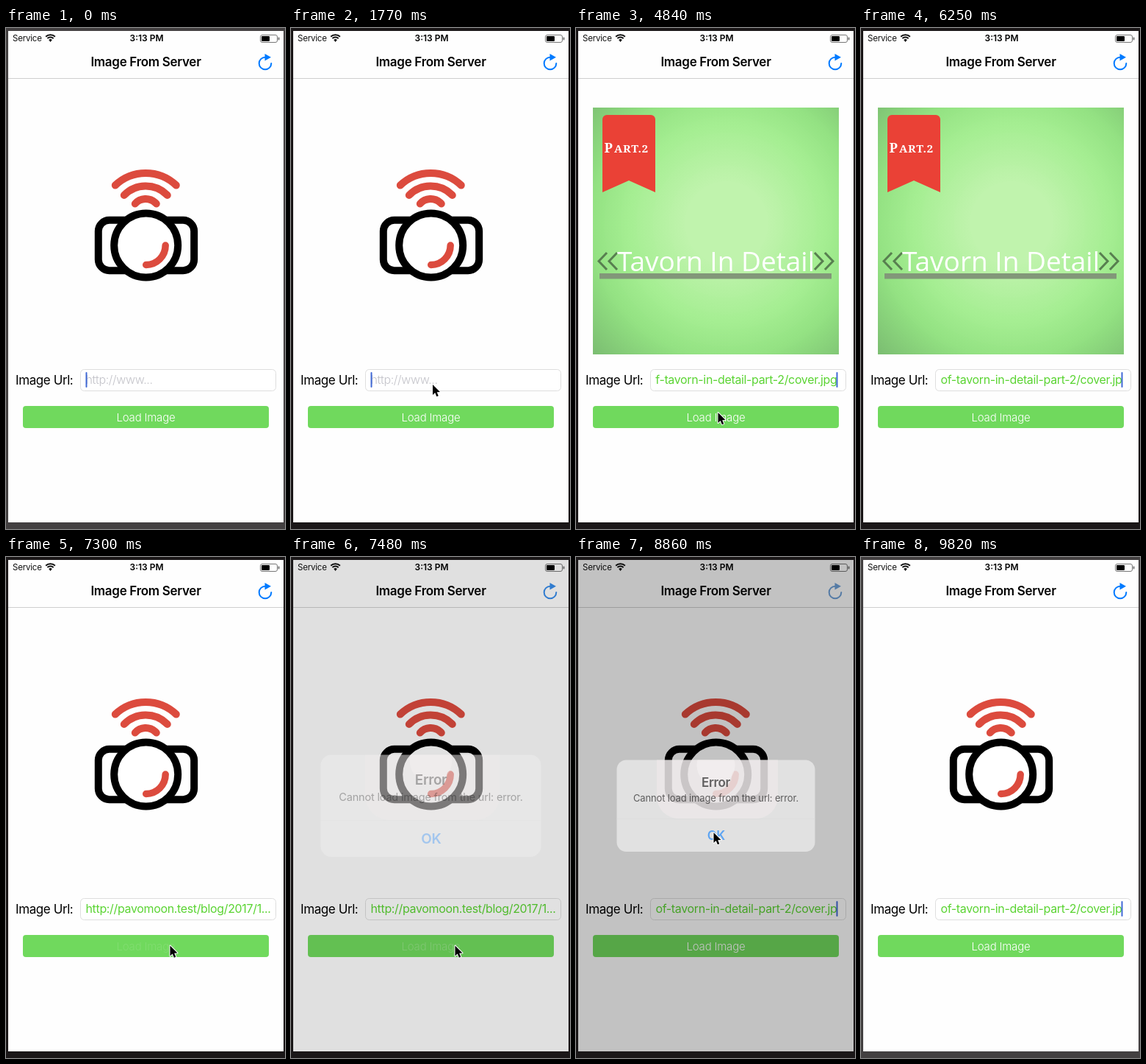
An HTML page with a canvas for the animation above (9890 ms loop, 380 by 680 pixels).

```html
<!DOCTYPE html>
<html lang="en">
<head>
<meta charset="utf-8">
<title>Image loader</title>
<style>
html, body { margin: 0; width: 100%; height: 100%; overflow: hidden; background: #1a1718; }
canvas { display: block; width: 380px; height: 680px; }
</style>
</head>
<body>
<canvas id="stage" width="380" height="680"></canvas>
<script>
const ctx = document.getElementById('stage').getContext('2d');
const LOOP = 9890;
const TAU = Math.PI * 2;
const BLUE = '#007aff', RED = '#dc4b3e', GREEN = '#70d95d', LINK = '#5bd433';
const SANS = 'Inter, "Liberation Sans", sans-serif';
const FULL_URL = 'f-tavorn-in-detail-part-2/cover.jpg';
const CUT_URL = 'of-tavorn-in-detail-part-2/cover.jp';
const HEAD_URL = 'http://pavomoon.test/blog/2017/1...';

// Moments of the story, in ms
const PASTED = 3520, LOADED = 4490, DELETED = 6100, FAILED = 7300, DISMISSED = 8680;

const clamp = u => Math.min(1, Math.max(0, u));
const ease = u => u * u * (3 - 2 * u);
const mix = (a, b, u) => a + (b - a) * u;
const ramp = (t, from, span) => ease(clamp((t - from) / span));
const pulse = (t, on, off, span) => ramp(t, on, span) - ramp(t, off, span);
const within = (t, a, b) => t >= a && t < b;

function box(x, y, w, h, r, fill) {
  ctx.beginPath();
  ctx.roundRect(x, y, w, h, r);
  if (fill) { ctx.fillStyle = fill; ctx.fill(); }
}

function disc(x, y, r, fill) {
  ctx.beginPath();
  ctx.arc(x, y, r, 0, TAU);
  ctx.fillStyle = fill;
  ctx.fill();
}

function poly(points, fill) {
  ctx.beginPath();
  points.forEach(([x, y]) => ctx.lineTo(x, y));
  ctx.closePath();
  if (fill) { ctx.fillStyle = fill; ctx.fill(); }
}

function stroke(color, width, cap = 'butt') {
  ctx.strokeStyle = color;
  ctx.lineWidth = width;
  ctx.lineCap = cap;
  ctx.stroke();
}

function arc(x, y, r, from, to, color, width, cap) {
  ctx.beginPath();
  ctx.arc(x, y, r, from, to);
  stroke(color, width, cap);
}

function text(str, x, y, size, color, { weight = 400, gap = 0, align = 'left', family = SANS } = {}) {
  ctx.font = `${weight} ${size}px ${family}`;
  ctx.letterSpacing = gap + 'px';
  ctx.textAlign = align;
  ctx.fillStyle = color;
  ctx.fillText(str, x, y);
}

function faded(alpha, draw) {
  if (alpha <= 0) return;
  ctx.save();
  ctx.globalAlpha *= alpha;
  draw();
  ctx.restore();
}

function statusBar() {
  text('Service', 9, 18, 11.5, '#111', { gap: -0.2 });
  for (const r of [9.2, 6]) arc(60.5, 18.5, r, -2.33, -0.81, '#111', 2);
  ctx.beginPath();
  ctx.moveTo(60.5, 19);
  ctx.arc(60.5, 18.5, 3.4, -2.33, -0.81);
  ctx.fillStyle = '#111';
  ctx.fill();
  text('3:13 PM', 191.5, 18, 12, '#000', { weight: 600, align: 'center' });
  box(346.5, 9.5, 23, 10, 2.5);
  stroke('#777', 1);
  box(348, 11, 11, 7, 1, '#000');
  box(370.5, 12.5, 2, 4, 1, '#777');
}

function navBar(dim) {
  text('Image From Server', 190.5, 52, 17, '#000', { weight: 600, gap: -0.3, align: 'center' });
  ctx.fillStyle = '#cfcfcf';
  ctx.fillRect(3, 68, 375, 1);
  const tint = `rgb(${mix(0, 187, dim)}, ${mix(122, 187, dim)}, ${mix(255, 187, dim)})`;
  arc(353, 48, 8.3, 0, TAU * 0.75, tint, 2, 'round');
  poly([[352.5, 35], [361, 39.8], [352.5, 44.6]], tint);
}

// Arc through two level ends and a top point
function arch(half, top, bottom) {
  const rise = bottom - top;
  const r = (half * half + rise * rise) / (2 * rise);
  const a = Math.asin(half / r);
  arc(190.3, top + r, r, -TAU / 4 - a, -TAU / 4 + a, RED, 10, 'round');
}

function camera() {
  arch(41.5, 197, 213.5);
  arch(29.5, 214.5, 227);
  arch(14.5, 232, 238.5);
  box(125.8, 260.8, 130.4, 68.4, 15);
  stroke('#000', 10);
  disc(190.7, 295, 43.5, '#fff');
  stroke('#000', 10);
  arc(190.7, 295, 26.5, 0, TAU / 4, RED, 9.5, 'round');
}

function ribbon() {
  ctx.save();
  poly([[36, 118], [108, 118], [108, 223], [72, 207], [36, 223]]);
  ctx.clip();
  box(36, 118, 72, 120, 6, '#ea4136');
  ctx.restore();
  const serif = { weight: 600, gap: 0.8, family: '"Noto Serif", serif' };
  text('P', 38.5, 169, 18, '#fff', serif);
  text('ART.2', 52, 169, 15, '#fff', serif);
}

function chevron(x, size) {
  ctx.beginPath();
  ctx.moveTo(x + size, 305);
  ctx.lineTo(x, 316.5);
  ctx.lineTo(x + size, 328);
  stroke('#587f50', 3);
}

function cover() {
  ctx.save();
  box(23, 108, 335, 335, 0);
  ctx.clip();
  const glow = ctx.createRadialGradient(205, 265, 57, 205, 265, 250);
  glow.addColorStop(0, '#b9f3a6');
  glow.addColorStop(0.4, '#a2ee8f');
  glow.addColorStop(0.65, '#93e282');
  glow.addColorStop(1, '#7cbf72');
  ctx.fillStyle = glow;
  ctx.fillRect(23, 108, 335, 335);
  for (let r = 57; r < 200; r += 22) disc(205, 265, r, 'rgba(255,255,255,.01)');
  ribbon();
  for (const step of [0, 14]) {
    chevron(31 + step, 11);
    chevron(350 - step, -11);
  }
  text('Tavorn In Detail', 190.5, 330, 37, '#fff', { align: 'center', family: '"Open Sans", sans-serif' });
  ctx.fillStyle = '#829779';
  ctx.fillRect(32, 333, 316, 7.5);
  ctx.restore();
}

// Solid for a while after each edit or tap, then a steady blink
function caretAlpha(t) {
  if (within(t, 2380, PASTED) || within(t, FAILED, DISMISSED)) return 0;
  const reset = [-520, 1510, PASTED, DELETED, DISMISSED, 9370].findLast(r => t >= r);
  const u = t - reset - 610;
  return u < 0 ? 1 : 1 - pulse(u % 880, 0, 350, 260);
}

function field(t) {
  text('Image Url:', 13, 484, 17, '#000', { gap: -0.41 });
  box(101.5, 463.5, 266, 29, 5, '#fff');
  stroke('#dedede', 1);
  const style = { gap: -0.35 };
  const pasted = t >= PASTED;
  if (!pasted) {
    text('http://www...', 108.5, 483, 16, '#c3c3c9', { ...style, weight: 300 });
  } else if (within(t, FAILED, DISMISSED)) {
    text(HEAD_URL, 108.5, 483, 16, LINK, style);
  } else {
    text(t < DELETED ? FULL_URL : CUT_URL, 355.5, 483, 16, LINK, { ...style, align: 'right' });
  }
  faded(caretAlpha(t), () => box(pasted ? 354.5 : 108.5, 467, 2, 21, 1, '#4069d6'));
}

// Label drops on press and fades back after release
const pressed = (t, down, up) => t < down ? 0 : 0.88 * (1 - ramp(t, up, 380));

function button(t) {
  box(23, 513, 335, 30, 4, GREEN);
  faded(1 - pressed(t, 4400, LOADED) - pressed(t, FAILED, FAILED + 100) * (t >= FAILED), () =>
    text('Load Image', 190.5, 533.5, 15, '#fff', { weight: 300, gap: -0.2, align: 'center' }));
}

function screen(t, dim) {
  ctx.fillStyle = '#fefefe';
  ctx.fillRect(3, 4, 375, 667);
  statusBar();
  navBar(dim);
  within(t, LOADED, FAILED) ? cover() : camera();
  field(t);
  button(t);
}

function loupe(t) {
  const k = pulse(t, 2130, 2480, 230);
  if (k <= 0) return;
  ctx.save();
  ctx.globalAlpha = k;
  ctx.translate(193, 429 + 50 * (1 - k));
  ctx.scale(k, k);
  ctx.save();
  box(-59, -59, 118, 118, 59);
  ctx.clip();
  ctx.scale(1.25, 1.25);
  ctx.translate(-193, -478);
  screen(t, 0);
  ctx.restore();
  arc(0, 0, 59, 0, TAU, '#b5b5b8', 2);
  ctx.restore();
}

function pasteMenu() {
  box(74, 413, 70, 36, 7, '#2a2a2b');
  poly([[99.5, 448.5], [118.5, 448.5], [109, 458]], '#2a2a2b');
  text('Paste', 109, 436, 14, '#fff', { weight: 300, gap: -0.2, align: 'center' });
}

function alertBox(t, shown) {
  const scale = t < DISMISSED ? mix(1.16, 1, shown) : 1;
  ctx.save();
  ctx.translate(190.5, 338);
  ctx.scale(scale, scale);
  ctx.translate(-190.5, -338);
  box(55.5, 275.5, 270, 124.5, 13, '#f6f6f6');
  ctx.save();
  ctx.clip();
  box(110, 262, 165, 93, [0, 0, 30, 30], '#f1ebec');
  disc(190.5, 283, 26, '#f7f4f4');
  if (within(t, 8510, DISMISSED)) {
    ctx.fillStyle = '#e6e6e6';
    ctx.fillRect(55, 356, 271, 45);
  }
  ctx.fillStyle = '#dcdcdc';
  ctx.fillRect(55, 355, 271, 1);
  ctx.restore();
  text('Error', 190.5, 312, 17, '#000', { weight: 600, gap: -0.35, align: 'center' });
  text('Cannot load image from the url: error.', 190.5, 332, 13, '#000', { gap: -0.15, align: 'center' });
  text('OK', 190.8, 384, 17, BLUE, { weight: 600, gap: -0.35, align: 'center' });
  ctx.restore();
}

const MOVES = [
  { at: 700, span: 800, x: 193, y: 484 },      // field
  { at: 2550, span: 700, x: 107.5, y: 430 },   // paste
  { at: PASTED, span: 730, x: 193.5, y: 522 }, // load
  { at: 5020, span: 260, x: 267, y: 484.5 },   // field
  { at: 6700, span: 430, x: 223.5, y: 527.5 }, // load
  { at: 7560, span: 780, x: 187.5, y: 374 },   // ok
  { at: 8900, span: 450, x: 200, y: 648 }      // away
];

function cursor(t) {
  const typing = within(t, 5600, 6780);
  if (!within(t, 700, 9350) || typing) return;
  let x = 205, y = 618;
  for (const move of MOVES) {
    const u = ramp(t, move.at, move.span);
    x = mix(x, move.x, u);
    y = mix(y, move.y, u);
  }
  ctx.save();
  ctx.translate(x, y);
  poly([[0, 0], [0, 14], [3.2, 11.1], [5.4, 16.2], [7.8, 15.2], [5.7, 10.2], [10, 10]]);
  ctx.lineJoin = 'round';
  stroke('#fff', 2);
  ctx.fillStyle = '#000';
  ctx.fill();
  ctx.restore();
}

function render(t) {
  const shown = pulse(t, 7340, DISMISSED + 10, 390);
  ctx.fillStyle = '#434041';
  ctx.fillRect(0, 0, 380, 680);
  faded(pulse(t, 1520, 9640, 180), () => {
    ctx.fillStyle = '#1a1718';
    ctx.fillRect(0, 0, 380, 680);
  });
  screen(t, shown);
  loupe(t);
  faded(pulse(t, 2680, 3440, 200), pasteMenu);
  faded(shown, () => {
    ctx.fillStyle = 'rgba(0,0,0,.4)';
    ctx.fillRect(3, 4, 375, 667);
    alertBox(t, shown);
  });
  cursor(t);
}

const start = performance.now();
function tick() {
  render((performance.now() - start) % LOOP);
  requestAnimationFrame(tick);
}
tick();
</script>
</body>
</html>
```
